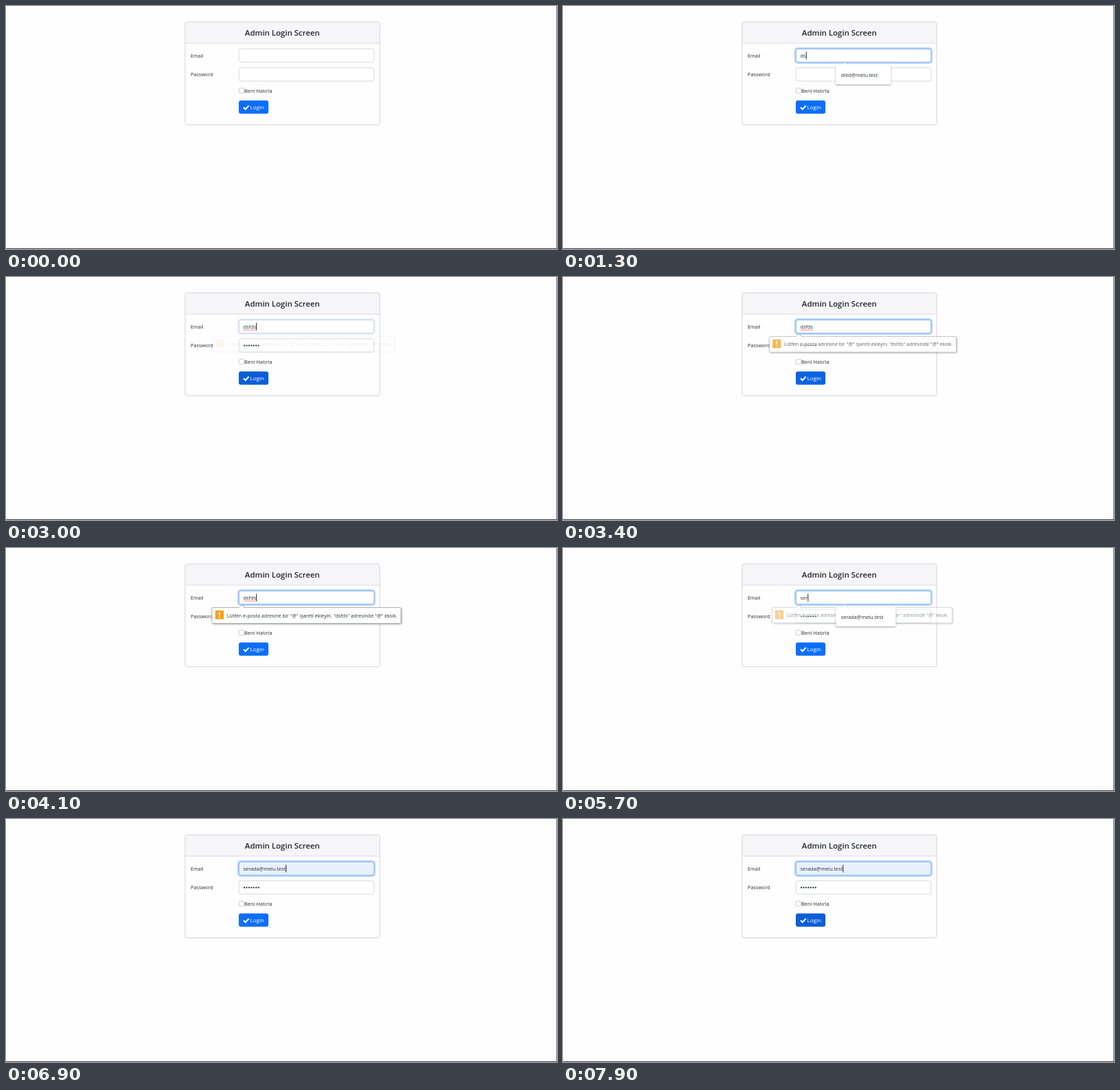
These frames come from a looping animation (800 px wide and 353 px high, 8000 ms). An HTML page:

```html
<!DOCTYPE html>
<html lang="tr">
<head>
<meta charset="utf-8">
<title>Admin Login Screen</title>
<style>
  html, body { margin: 0; width: 100%; height: 100%; overflow: hidden; background: #fefdff; }
  svg { display: block; width: 800px; height: 353px; }
  text { font: 7.3px "Open Sans", "Noto Sans", sans-serif; fill: #2b3035; white-space: pre; }
  .title { font-size: 11.4px; font-weight: 600; fill: #212529; text-anchor: middle; }
  .login { font-size: 8px; fill: #fff; }
  .hint { font-size: 7.15px; }
  .preview { font: 6.5px "Liberation Sans", Arial, sans-serif; fill: #000; }
  .field { stroke: #d3d5da; stroke-width: .9; }
  .glow { fill: none; stroke: #0d6efd; stroke-width: 2.2; stroke-opacity: .27; }
  .ring { fill: none; stroke: #86b7fe; stroke-width: 1; }
  .caret { fill: #111; }
  .soft { filter: drop-shadow(0 1px 1.2px rgba(0, 0, 0, .38)); }
  .hard { filter: drop-shadow(1.5px 1.5px 1.2px rgba(0, 0, 0, .35)); }
</style>
</head>
<body>
<svg viewBox="0 0 800 353">
  <rect width="800" height="353" fill="#fefdff"/>
  <rect x="260" y="23" width="282.7" height="149.7" rx="3.5" fill="#fefdff"/>
  <path d="M260 54V26.5a3.5 3.5 0 0 1 3.5-3.5h275.7a3.5 3.5 0 0 1 3.5 3.5V54z" fill="#f6f5f8"/>
  <path d="M260 54h282.7" stroke="#d8d7dc" stroke-width=".9"/>
  <rect x="260" y="23" width="282.7" height="149.7" rx="3.5" fill="none" stroke="#d2d1d6" stroke-width=".9"/>
  <text class="title" x="401.2" y="42.8">Admin Login Screen</text>
  <text x="268" y="75">Email</text>
  <text x="268" y="102.4">Password</text>

  <g id="email"></g>
  <rect id="marked" x="344.5" y="66.5" height="11" fill="#3390ff"/>
  <text id="value" x="344.6" y="75"></text>
  <path id="squiggle" fill="none" stroke="#e8383d" stroke-width=".7"/>
  <rect id="emailCaret" class="caret" y="66.5" width=".9" height="11"/>

  <g id="password"></g>
  <g id="dots" fill="#212529"></g>
  <rect id="passCaret" class="caret" y="94" width=".9" height="11"/>

  <rect x="338.3" y="119.3" width="7.4" height="7.4" rx="1.6" fill="#fff" stroke="#bfc1c6" stroke-width=".8"/>
  <text x="346" y="126.2" style="font-size:7.45px">Beni Hatırla</text>
  <rect id="button" x="338" y="137.3" width="43" height="19.2" rx="3"/>
  <path d="M345 147.3l2.7 2.7 4.9-5.3" fill="none" stroke="#fff" stroke-width="2"/>
  <text class="login" x="354.6" y="150">Login</text>

  <g id="bubble">
    <g class="hard">
      <path id="box" fill="#fff" stroke="#a3a3a8" stroke-width=".8"/>
    </g>
    <g id="icon">
      <rect width="12.4" height="12.8" rx="1" fill="#f9a11b"/>
      <path d="M6.2 2.4v4.8M6.2 8.8v1.8" stroke="#fff" stroke-width="1.8"/>
    </g>
    <text id="hint" class="hint" y="100.6"></text>
  </g>

  <g id="list"></g>

  <path d="M799.5 0V353" stroke="#77757c"/>
  <path d="M0 352.5H800" stroke="#3f3d43"/>
</svg>
<script>
const LOOP = 8000, STEP = 100;
const $ = id => document.getElementById(id);
const ramp = (t, start, len) => Math.min(1, Math.max(0, (t - start) / len));
const within = (t, spans) => spans.some(([a, b]) => t >= a && t < b);
const latest = (t, table) => table.filter(row => row[0] <= t).pop();
const show = (el, on) => el.setAttribute("visibility", on ? "visible" : "hidden");
const set = (el, attrs) => Object.entries(attrs).forEach(([k, v]) => el.setAttribute(k, v));

const ADMIN = "serada@melu.test", OTHER = "dled@melu.test";
const ALL = [OTHER, ADMIN, "sinem@tovu.test", "deneme@melu.test", "yeni@tovu.test"];

// start, text in the email field
const TYPED = [[0, ""], [1000, "d"], [1200, "ds"], [1400, "dsf"], [1500, "dsfd"], [1600, "dsfds"],
  [5000, ""], [5400, "s"], [5500, "se"], [5600, "ser"], [6200, ADMIN]];

// start, suggestions, width, top
const LISTS = [[0, []], [400, ALL, 87, 86], [1000, [OTHER], 80, 86], [1400, []],
  [1900, ["Kayıtlı şifreleri yönet"], 186, 113.5], [2200, []],
  [5400, [ADMIN, ALL[2]], 87, 86], [5600, [ADMIN], 87, 86], [6500, []]];

const EMAIL_CARET = [[100, 600], [1000, 1800], [2900, 3400], [4000, 4600], [5000, 6200], [6700, 7200], [7700, LOOP]];

function makeField(id, y) {
  const rect = (cls, pad, r) =>
    `<rect class="${cls}" x="${338.2 - pad}" y="${y - pad}" width="${196.2 + 2 * pad}" height="${19.4 + 2 * pad}" rx="${r}"/>`;
  $(id).innerHTML = rect("field", 0, 3) + `<g class="focus">${rect("glow", 1.2, 4)}${rect("ring", 0, 3)}</g>`;
  const [base, focus] = $(id).children;
  return (amount, fill) => {
    focus.style.opacity = amount;
    base.setAttribute("fill", fill);
  };
}

const emailField = makeField("email", 62.3);
const passField = makeField("password", 89.7);
$("dots").innerHTML = Array.from({ length: 7 }, (_, i) =>
  `<circle cx="${346 + i * 3.45}" cy="99.6" r="1.15"/>`).join("");

let listKey = "";
function drawList(t) {
  const [start, items, width, top] = latest(t, LISTS);
  const hover = t >= 6200;
  const key = start + "," + hover;
  if (key !== listKey) {
    listKey = key;
    const right = 396 + width, bottom = top + 28 + (items.length - 1) * 27;
    $("list").innerHTML = !items.length ? "" :
      `<path class="soft" fill="#fff" d="M397.5 ${top}H405l4-4 4 4H${right - 1.5}q1.5 0 1.5 1.5V${bottom - 1.5}q0 1.5-1.5 1.5H397.5q-1.5 0-1.5-1.5V${top + 1.5}q0-1.5 1.5-1.5z"/>` +
      (hover ? `<rect x="396" y="${top + 3.5}" width="${width}" height="22" fill="#e6e5e7"/>` : "") +
      items.map((s, i) => `<text x="403.6" y="${top + 17 + i * 27}">${s}</text>`).join("");
  }
  $("list").style.opacity = start === 400 ? ramp(t, 300, 300) : 1;
}

function drawBubble(t, value) {
  const start = t < 5400 ? 2950 : 5400;
  const amount = ramp(t, start, 600) * (1 - ramp(t, 6450, 400));
  show($("bubble"), amount > 0);
  if (!amount) return;
  const subject = t < 5400 ? "dsfds" : t < 6200 ? value : "ser";
  const text = `Lütfen e-posta adresine bir "@" işareti ekleyin. "${subject}" adresinde "@" eksik.`;
  if ($("hint").textContent !== text) $("hint").textContent = text;
  const width = $("hint").getComputedTextLength() + 27;
  const left = 436.2 - width / 2;
  $("hint").setAttribute("x", left + 21.8);
  $("icon").setAttribute("transform", `translate(${left + 4.8} 90.8)`);
  $("box").setAttribute("d", `M${left + 1} 86.5H338l4-4.2 4 4.2H${left + width - 1}l1 1v21l-1 1H${left + 1}l-1-1v-21z`);
  const scale = .957 + .043 * amount;
  $("bubble").setAttribute("transform", `translate(342 82) scale(${scale}) translate(-342 -82)`);
  $("bubble").style.opacity = amount;
}

function drawEmail(t, value) {
  const focus = ramp(t, 50, 200) * (1 - ramp(t, 1750, 150)) + ramp(t, 2960, 150);
  emailField(focus, t >= 6200 ? "#e8f0fe" : "#fff");
  const preview = t >= 6200 && t < 6500;
  const marked = t >= 4900 && t < 5000;
  const el = $("value");
  if (el.textContent !== value) el.textContent = value;
  el.setAttribute("class", preview ? "preview" : "");
  el.style.fill = marked ? "#fff" : "";
  const width = value ? el.getComputedTextLength() : 0;
  $("marked").setAttribute("width", marked ? width : 0);
  const wavy = value === "dsfds" && t >= 1700 && !marked;
  show($("squiggle"), wavy);
  if (wavy) $("squiggle").setAttribute("d", "M344.6 77" + "q.75 -1.2 1.5 0t1.5 0".repeat(Math.round(width / 3)));
  $("emailCaret").setAttribute("x", 344.8 + width);
  show($("emailCaret"), within(t, EMAIL_CARET));
}

function drawPassword(t) {
  passField(ramp(t, 1750, 150) * (1 - ramp(t, 2550, 150)), "#fff");
  const count = Math.min(7, Math.max(0, Math.floor((t - 2100) / 60)));
  [...$("dots").children].forEach((dot, i) => show(dot, i < count));
  $("passCaret").setAttribute("x", 344.8 + count * 3.45);
  show($("passCaret"), within(t, [[1800, 2600]]));
}

function drawButton(t) {
  const hover = ramp(t, 2500, 150) * (1 - ramp(t, 3350, 150)) + ramp(t, 7150, 150);
  const mix = (a, b) => Math.round(a + (b - a) * hover);
  $("button").setAttribute("fill", `rgb(${mix(13, 11)},${mix(110, 94)},${mix(253, 215)})`);
}

function draw() {
  const t = Math.floor(performance.now() % LOOP / STEP) * STEP;
  const value = latest(t, TYPED)[1];
  drawEmail(t, value);
  drawPassword(t);
  drawButton(t);
  drawBubble(t, value);
  drawList(t);
  requestAnimationFrame(draw);
}
draw();
</script>
</body>
</html>
```
